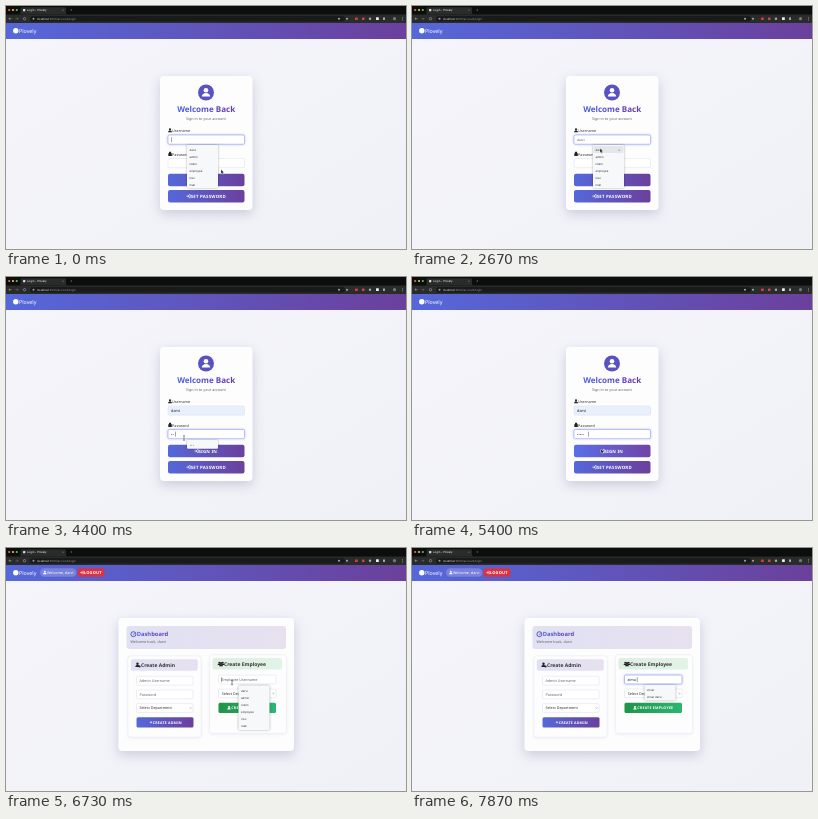
An HTML page that plays this animation: 400x243 px, repeating every 8 s.

```html
<!DOCTYPE html>
<html lang="en">
<head>
<meta charset="utf-8">
<title>Login</title>
<style>
html, body { margin: 0; width: 100%; height: 100%; overflow: hidden; background: #f3f3f9; }
svg { display: block; width: 100vw; height: 100vh; }
text { font: 3.7px "Noto Sans", "Open Sans", sans-serif; fill: #333; text-rendering: geometricPrecision; white-space: pre; }
.bold { font-weight: 700; }
.caps { font-weight: 700; fill: #fff; letter-spacing: .2px; }
.mute { fill: #666; }
.tiny { font-family: Inter, Roboto, sans-serif; font-size: 2.8px; }
.white { fill: #fff; }
.field { fill: #fff; stroke: #d9dde6; stroke-width: .5; }
.tray { fill: #f6f8f9; filter: drop-shadow(0 .5px 1.2px #0005); }
.card { fill: #fdfdfe; filter: drop-shadow(0 4px 6px #28286430); }
.panel { fill: #fdfdfe; stroke: #e6e7ef; stroke-width: .4; filter: drop-shadow(0 1px 1.5px #28286414); }
</style>
</head>
<body>
<svg viewBox="0 0 400 243" preserveAspectRatio="none" xmlns="http://www.w3.org/2000/svg">
  <defs>
    <linearGradient id="brand"><stop stop-color="#5568da"/><stop offset="1" stop-color="#6b409c"/></linearGradient>
    <linearGradient id="title"><stop stop-color="#4b62dc"/><stop offset="1" stop-color="#6939b4"/></linearGradient>
    <linearGradient id="green"><stop stop-color="#209447"/><stop offset="1" stop-color="#2bb673"/></linearGradient>
    <linearGradient id="lilac"><stop stop-color="#e0e1f3"/><stop offset="1" stop-color="#e7e1ef"/></linearGradient>
    <linearGradient id="mint"><stop stop-color="#deeee2"/><stop offset="1" stop-color="#e2f3e8"/></linearGradient>
    <linearGradient id="page" x2="1" y2="1"><stop stop-color="#f5f5fb"/><stop offset="1" stop-color="#f0f0f7"/></linearGradient>
    <g id="user"><circle cy="-1.1" r="1.1"/><path d="M-2 1.9C-2-.4 2-.4 2 1.9Z"/></g>
    <g id="enter" fill="none" stroke="#fff" stroke-width=".7"><path d="M-2 0H.7M-.5-1.2L.8 0-.5 1.2M.8-1.6H1.9V1.6H.8"/></g>
    <path id="chevron" d="M-.9-.4L0 .5.9-.4" fill="none" stroke="#444" stroke-width=".4"/>
  </defs>

  <rect width="400" height="243" fill="url(#page)"/>

  <!-- browser bar -->
  <rect width="400" height="17" fill="#0c0d0d"/>
  <rect y="8.5" width="400" height="8.5" fill="#2a2b2b"/>
  <path d="M13 8.6Q14.5 8.4 14.5 7V2.6Q14.5 1.2 16 1.2H58.500Q60 1.200 60 2.600V7Q60 8.400 61.500 8.600Z" fill="#2a2b2b"/>
  <circle cx="3.200" cy="4" r="1.100" fill="#ee6a5f"/>
  <circle cx="7" cy="4" r="1.100" fill="#f5bd4f"/>
  <circle cx="10.800" cy="4" r="1.100" fill="#61c454"/>
  <rect x="17" y="3" width="2.300" height="2.300" rx=".5" fill="#ddd"/>
  <text class="tiny white" x="21" y="5.100">Login - Plovely</text>
  <text class="tiny" x="56" y="5.200" style="fill:#bbb">×</text>
  <text class="tiny" x="64" y="5.300" style="fill:#bbb;font-size:3.500px">+</text>
  <g fill="none" stroke="#bbb" stroke-width=".5">
    <path d="M5.500 12.700H3M4 11.600L2.900 12.700 4 13.800"/>
    <path d="M9.500 12.700H12M11 11.600L12.100 12.700 11 13.800" stroke="#777"/>
    <circle cx="18.500" cy="12.700" r="1.200"/>
  </g>
  <rect x="24" y="9.900" width="315" height="5.700" rx="2.850" fill="#191a1a"/>
  <circle cx="27.500" cy="12.700" r="1" fill="#999"/>
  <text class="tiny" x="31" y="13.700" style="fill:#999"><tspan fill="#eee">localhost</tspan>:3000/account/login</text>
  <g fill="#aaa">
    <circle cx="333" cy="12.700" r="1"/><circle cx="341" cy="12.700" r="1"/>
    <rect x="349" y="11.500" width="2.800" height="2.400" rx=".5" fill="#d93a3a"/>
    <rect x="356" y="11.500" width="2.500" height="2.500" rx=".5" fill="#c24b52"/>
    <circle cx="364" cy="12.700" r="1.200"/>
    <rect x="370" y="11.300" width="2.800" height="2.800" rx=".5" fill="#eee"/>
    <rect x="377" y="11.500" width="2" height="2.400"/>
    <circle cx="388.500" cy="12.700" r="1.600" fill="#777"/>
    <path d="M396 11.200h.7v.7h-.7zM396 12.500h.7v.7h-.7zM396 13.800h.7v.7h-.7z"/>
  </g>

  <!-- site header -->
  <rect y="17" width="400" height="16" fill="url(#brand)"/>
  <circle cx="9.800" cy="24.700" r="2.700" fill="#fff"/>
  <text class="white" x="13" y="26.600" style="font-size:5.300px">Plovely</text>
  <g id="session">
    <rect x="34" y="20.200" width="36.500" height="8.600" rx="4.300" fill="#fff" fill-opacity=".2"/>
    <use href="#user" transform="translate(38.800 24.600) scale(.85)" fill="#fff"/>
    <text class="white" x="41" y="26">Welcome, darvi</text>
    <rect x="71.500" y="20.200" width="27" height="8.600" rx="2.500" fill="#d53348"/>
    <use href="#enter" transform="translate(75.800 24.500) scale(.8)"/>
    <text class="caps" x="77.800" y="26" style="font-size:4px">LOGOUT</text>
  </g>

  <g id="login">
    <rect class="card" x="154" y="70" width="92.500" height="134" rx="4"/>
    <circle cx="200" cy="86.500" r="8" fill="#5b52c2"/>
    <use href="#user" transform="translate(200 86.600) scale(2.100)" fill="#fff"/>
    <text class="bold" x="200.200" y="105.500" text-anchor="middle" style="font-size:8.050px;fill:url(#title)">Welcome Back</text>
    <text class="mute" x="200" y="113.800" text-anchor="middle">Sign in to your account</text>
    <use href="#user" x="164" y="124.400" fill="#222"/>
    <text x="166.100" y="126">Username</text>
    <rect id="nameBox" class="field" x="162" y="129" width="76.500" height="9.200" rx="1.500"/>
    <text id="nameText" x="165" y="135.200"></text>
    <path d="M162.300 147.300h3.500v2.700h-3.500zM163 147.300v-1q1.050-1.600 2.100 0v1" fill="#222"/>
    <text x="166.100" y="149.600">Password</text>
    <rect id="passBox" class="field" x="162" y="152.500" width="76.500" height="9.200" rx="1.500"/>
    <text id="passText" x="165" y="158.600"></text>
    <rect id="signBtn" x="162" y="167.800" width="76.500" height="12.400" rx="2" fill="url(#brand)"/>
    <use href="#enter" x="190.300" y="174"/>
    <text class="caps" x="192.400" y="175.700" style="font-size:4.400px">SIGN IN</text>
    <rect x="162" y="184" width="76.500" height="12.400" rx="2" fill="url(#brand)"/>
    <use href="#enter" x="182.300" y="190.200"/>
    <text class="caps" x="184.700" y="191.900" style="font-size:4.400px">SET PASSWORD</text>
  </g>

  <g id="dash">
    <rect class="card" x="112.500" y="70" width="175.500" height="133" rx="4"/>
    <rect x="120.500" y="78" width="159.500" height="23" rx="3" fill="url(#lilac)"/>
    <circle cx="127.400" cy="86.200" r="2.500" fill="none" stroke="#5a55cb"/>
    <path d="M127.400 87.200L128.500 84.800" stroke="#5a55cb" stroke-width=".8"/>
    <text class="bold" x="130.700" y="88.300" style="font-size:5.800px;fill:url(#title)">Dashboard</text>
    <text class="mute" x="124.500" y="95">Welcome back, darvi</text>
    <g id="admin">
      <rect class="panel" x="122" y="108" width="73" height="81" rx="3"/>
      <rect x="124.800" y="111.300" width="67" height="11.400" rx="2" fill="url(#lilac)"/>
      <use href="#user" transform="translate(131.500 116.900) scale(1.100)" fill="#222"/>
      <circle cx="133.600" cy="118.400" r="1" fill="#222"/>
      <text class="bold" x="135" y="118.800" style="font-size:5px">Create Admin</text>
      <rect class="field" x="130.500" y="128.300" width="56.500" height="8.800" rx="1.200"/>
      <text class="mute" x="133.500" y="134.100">Admin Username</text>
      <rect class="field" x="130.500" y="142" width="56.500" height="8.800" rx="1.200"/>
      <text class="mute" x="133.500" y="147.700">Password</text>
      <rect class="field" x="130.500" y="155.600" width="56.500" height="8.800" rx="1.200"/>
      <text x="133.500" y="161.300">Select Department</text>
      <use href="#chevron" x="184.700" y="160"/>
      <rect x="130.500" y="169.200" width="57" height="10.200" rx="1.500" fill="url(#brand)"/>
      <path d="M143.800 174.300h2.400M145 173.100v2.400" stroke="#fff" stroke-width=".6"/>
      <text class="caps" x="146.700" y="175.700" style="font-size:3.600px">CREATE ADMIN</text>
    </g>
    <g id="staff">
      <rect class="panel" x="203.500" y="108" width="77" height="78.500" rx="3"/>
      <rect x="206.500" y="111.300" width="69.500" height="11.400" rx="2" fill="url(#mint)"/>
      <g fill="#222">
        <use href="#user" transform="translate(213.200 116.600) scale(.8)"/>
        <use href="#user" transform="translate(216.800 116.600) scale(.8)"/>
        <use href="#user" x="215" y="117.500"/>
      </g>
      <text class="bold" x="218" y="118.800" style="font-size:5px">Create Employee</text>
      <rect id="newBox" class="field" x="212.500" y="128.300" width="57.500" height="8.800" rx="1.200"/>
      <text id="newText" x="215.500" y="134.100"></text>
      <rect class="field" x="212.500" y="142.200" width="57.500" height="8.800" rx="1.200"/>
      <text x="215.800" y="148">Select Department</text>
      <use href="#chevron" x="267.500" y="146.600"/>
      <rect x="212.500" y="156" width="57.500" height="10.200" rx="1.500" fill="url(#green)"/>
      <use href="#user" transform="translate(223 161.100) scale(.9)" fill="#fff"/>
      <text class="caps" x="225.300" y="162.500" style="font-size:3.650px">CREATE EMPLOYEE</text>
    </g>
  </g>

  <rect id="caret" width=".4" height="5" fill="#222"/>
  <g id="list">
    <rect id="tray" class="tray" width="31" rx="1"/>
    <rect id="pick" x=".5" y="1" width="30" height="7" rx=".8" fill="#e4e7e9"/>
    <g id="items"></g>
    <text id="cross" class="tiny" x="25.300" y="5.800">×</text>
  </g>
  <path id="arrow" d="M0 0V4.200L1 3.300 1.700 4.900 2.400 4.600 1.700 3.100H3Z" fill="#111" stroke="#fff" stroke-width=".3"/>
  <path id="beam" d="M-.9-2.400Q0-2.400 0-1.800Q0-2.400.9-2.400M0-1.800V1.800M-.9 2.400Q0 2.400 0 1.800Q0 2.400.9 2.400" fill="none" stroke="#222" stroke-width=".5"/>
</svg>
<script>
const LOOP = 8000;
const users = ["darvi", "admin", "rolem", "employee", "niso", "mab"];
const matches = ["zimar", "zimar darvi"];
// time, x, y
const path = [
  [0, 215, 163.500], [250, 215, 163.500], [800, 211, 150], [1000, 210, 147], [1350, 206, 132.800],
  [2270, 206, 132.800], [2620, 188, 142.500], [3130, 188, 142.500], [3800, 178, 161],
  [4870, 178, 161], [5350, 189, 172], [5730, 189, 172], [5870, 218.500, 141.500],
  [6330, 226, 134.500], [8000, 226, 134.500]
];

const $ = id => document.getElementById(id);
const clamp = v => Math.max(0, Math.min(1, v));
const ease = (t, start, span) => { const k = clamp((t - start) / span); return k * k * (3 - 2 * k); };
const show = (id, on) => { $(id).style.display = on ? "" : "none"; };
const place = (id, x, y) => $(id).setAttribute("transform", `translate(${x} ${y})`);
const typed = (t, start, step, max) => Math.max(0, Math.min(max, Math.floor((t - start) / step) + 1));

function pointer(t) {
  const i = path.findIndex(p => p[0] > t);
  const [a, b] = [path[i - 1], path[i]];
  const k = ease(t, a[0], b[0] - a[0]);
  return [a[1] + (b[1] - a[1]) * k, a[2] + (b[2] - a[2]) * k];
}

function write(id, value, color = "#333") {
  const el = $(id);
  if (el.textContent !== value) el.textContent = value;
  el.style.fill = color;
}

function focus(id, on, fill = "#fff") {
  const s = $(id).style;
  s.fill = fill;
  s.stroke = on ? "#8393ef" : "#d9dde6";
  s.filter = on ? "drop-shadow(0 0 1px #667eea88)" : "none";
}

let shown = "";
function list(labels, x, y, height, picked) {
  show("list", labels.length);
  place("list", x, y);
  $("tray").setAttribute("height", height);
  show("pick", picked);
  show("cross", picked);
  const key = labels.join();
  if (key === shown) return;
  shown = key;
  $("items").innerHTML = labels.map((s, i) =>
    `<text class="tiny" x="2.500" y="${6.200 + i * 7.050}">${s}</text>`).join("");
}

function draw(t) {
  const home = t >= 5730;
  const hover = t >= 2560 && t < 2900;
  const filled = t >= 2900;
  const onPass = t >= 3850;
  const chars = typed(t, 4070, 240, 5);
  const letters = typed(t, 7290, 145, 4);
  const onNew = t >= 6730;

  show("login", !home);
  show("dash", home);
  show("session", home);

  write("nameText", filled || hover ? users[0] : "", hover ? "#555" : "#222");
  $("nameText").style.fontSize = hover ? "3.200px" : "3.900px";
  focus("nameBox", !onPass, filled ? "#e8f0fe" : "#fff");
  write("passText", "•".repeat(chars));
  focus("passBox", onPass);
  $("signBtn").style.filter = t > 5200 ? "brightness(1.06)" : "none";

  write("newText", letters ? matches[0].slice(0, letters) : "Employee Username", letters ? "#222" : "#666");
  focus("newBox", onNew && t > 6760);
  const swap = ease(t, 5870, 300);
  place("admin", 0, -1.200 * (1 - swap));
  place("staff", 0, -1.200 * swap);

  if (!filled) list(users, 181, 139, 43, hover);
  else if (chars && t < 4870) list(["•••"], 181, 163, 8.800, false);
  else if (letters) list(matches, 232.500, 137, 15.500, false);
  else if (t >= 6470) list(users, 232.500, 137.500, 44.500, false);
  else list([], 0, 0, 0, false);

  const [cx, cy] = home ? [215.500 + letters * 2.350, 129.100]
    : onPass ? [165.200 + chars * 2.200, 154.700] : [165.200, 131.200];
  place("caret", cx, cy);
  show("caret", home ? onNew : onPass ? t < 5600 : !filled && !hover && !(t >= 2070 && t < 2270));

  const [x, y] = pointer(t);
  const inName = t >= 1300 && t < 2400;
  const inPass = t >= 3650 && t < 5000;
  const beam = inName || inPass || t >= 6200;
  place("arrow", x, y);
  place("beam", x, y);
  show("arrow", !beam);
  show("beam", beam && !letters);
}

function tick(now) {
  draw(now % LOOP);
  requestAnimationFrame(tick);
}
draw(0);
requestAnimationFrame(tick);
</script>
</body>
</html>
```
